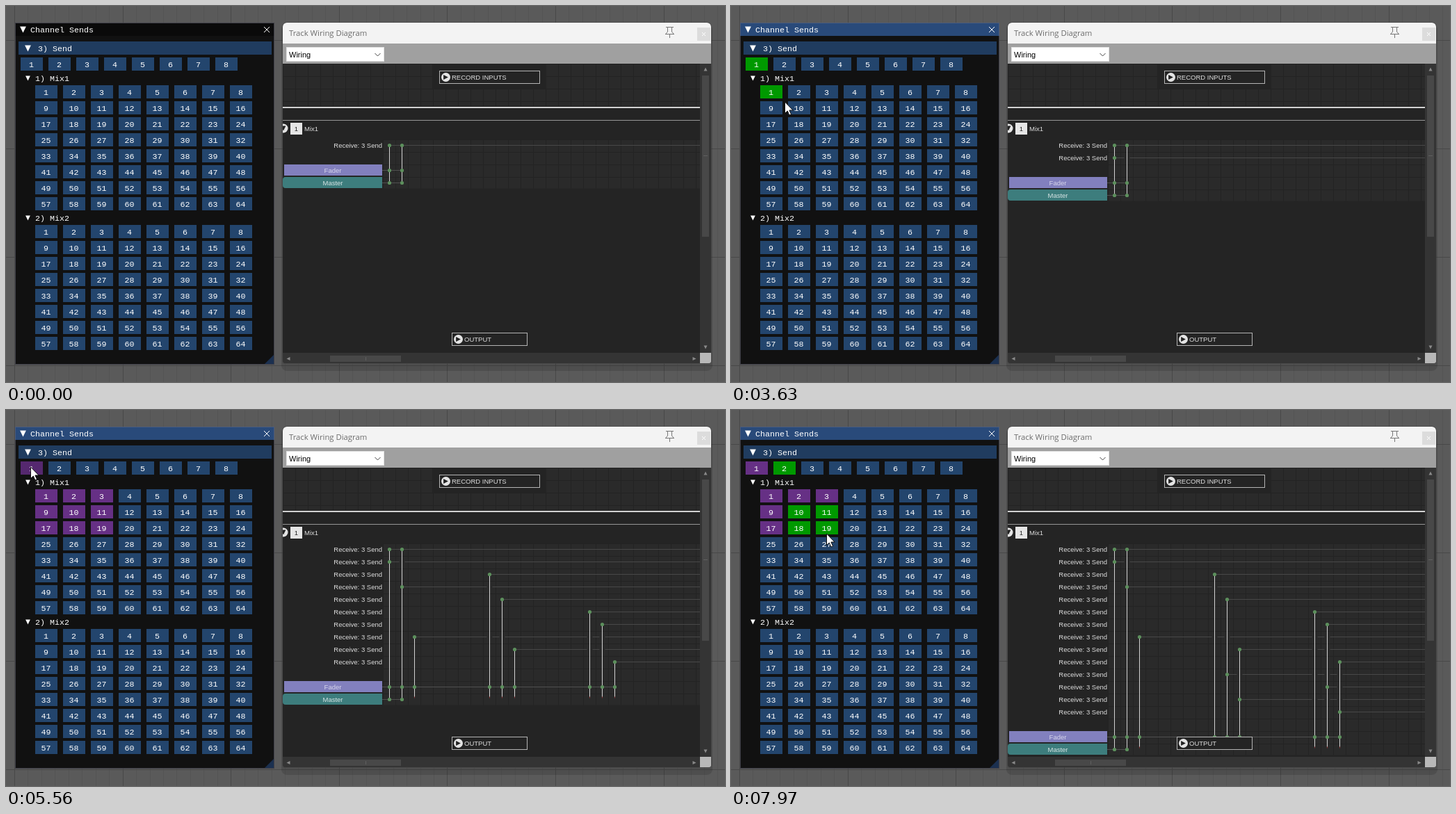
Animation, 1034 px wide and 541 px high, one loop 8000 ms. Source, as an HTML page with a canvas:

```html
<!DOCTYPE html>
<html lang="en">
<head>
<meta charset="utf-8">
<title>Channel Sends</title>
<style>
html, body { margin: 0; width: 100%; height: 100%; overflow: hidden; background: #5a5a5a; }
canvas { display: block; width: 100vw; height: 100vh; }
</style>
</head>
<body>
<canvas id="stage" width="1034" height="541"></canvas>
<script>
const ctx = document.getElementById('stage').getContext('2d');
const LOOP = 8000;
const MONO = '11.67px "Liberation Mono", monospace';
const SANS = '9.5px "Liberation Sans", Arial, sans-serif';

// Pointer strokes: start, end, destination. It rests in between.
const ENTRY = [376, 519];
const STROKES = [
  [360, 1090, 64, 191], [1260, 1380, 64, 133], [1380, 1860, 37, 80], [2460, 2770, 62, 124],
  [3420, 3630, 78, 138], [3630, 4100, 114, 168], [4160, 4460, 130, 171],
  [4700, 5050, 59, 94], [5050, 5320, 36, 82], [6060, 6400, 77, 82],
  [6890, 7360, 98, 147], [7590, 7790, 104, 164], [7790, 7970, 138, 178]
];

// Mouse button down and up
const SELECT = [2360, 2420], DRAG = [3300, 4460], DESELECT = [5500, 5560];
const SELECT_2 = [6590, 6710], DRAG_2 = [7470, LOOP];
const HOLDS = [SELECT, DRAG, DESELECT, SELECT_2, DRAG_2];

// Button fills: idle, hovered, held
const FILLS = {
  off: ['#23456d', '#4296fa', '#0f87fa'],
  on: ['#009900', '#008000', '#006600'],
  other: ['#663085', '#55286f', '#442059']
};

function rect(x, y, w, h, color) {
  ctx.fillStyle = color;
  ctx.fillRect(x, y, w, h);
}

function line(x1, y1, x2, y2, color) {
  ctx.strokeStyle = color;
  ctx.lineWidth = 1;
  ctx.beginPath();
  ctx.moveTo(x1, y1);
  ctx.lineTo(x2, y2);
  ctx.stroke();
}

function poly(points, color) {
  ctx.fillStyle = color;
  ctx.beginPath();
  points.forEach(([x, y]) => ctx.lineTo(x, y));
  ctx.closePath();
  ctx.fill();
}

function rounded(x, y, w, h, radii, color) {
  ctx.fillStyle = color;
  ctx.beginPath();
  ctx.roundRect(x, y, w, h, radii);
  ctx.fill();
}

function dot(x, y, r, color) {
  ctx.fillStyle = color;
  ctx.beginPath();
  ctx.arc(x, y, r, 0, 7);
  ctx.fill();
}

function text(str, x, y, color, font, align = 'left') {
  ctx.font = font;
  ctx.textAlign = align;
  ctx.fillStyle = color;
  ctx.fillText(str, x, y);
}

// Triangle pointing along (dx, dy)
function arrow(x, y, r, dx, dy, color) {
  poly([[x + dx * r, y + dy * r], [x - dx * r - dy * r, y - dy * r + dx * r],
    [x - dx * r + dy * r, y - dy * r - dx * r]], color);
}

function pointerAt(t) {
  if (t < STROKES[0][0]) return null;
  let [x, y] = ENTRY;
  STROKES.forEach(([start, end, toX, toY], i) => {
    if (t < start) return;
    let k = Math.min(1, (t - start) / (end - start));
    if (i === 0) k = k * (2 - k);
    x += (toX - x) * k;
    y += (toY - y) * k;
  });
  return [Math.round(x), Math.round(y)];
}

const sendBox = n => [21 + (n - 1) * 40, 74, 32, 19];
const cellBox = (i, top) => [42 + i % 8 * 40, top + (i >> 3) * 23, 32, 19];
const inside = (p, [x, y, w, h]) => !!p && p[0] >= x && p[0] < x + w && p[1] >= y && p[1] < y + h;

function cellUnder(p) {
  for (let i = 0; i < 64; i++) if (inside(p, cellBox(i, 114))) return i;
  return -1;
}

// Cells swept by a drag: everything between the first and the hovered cell, column by column
function swept([start, end], t) {
  const found = new Set();
  const first = cellUnder(pointerAt(start));
  for (let s = start; s <= Math.min(t, end); s += 10) {
    const cell = cellUnder(pointerAt(s));
    if (cell < 0) continue;
    for (let col = first % 8; col <= cell % 8; col++)
      for (let row = first >> 3; row <= cell >> 3; row++) found.add(row * 8 + col);
  }
  return [...found];
}

function drawDesk() {
  rect(0, 0, 1034, 541, '#5a5a5a');
  for (let i = 0; i < 53; i++) rect(Math.round(12 + i * 19.45), 0, 1, 541, i % 8 ? '#545454' : '#484848');
  for (let y = 49; y < 541; y += 156) rect(0, y, 1034, 1, '#484848');
}

function drawSends(t, mouse, firstCells, secondCells) {
  const hold = HOLDS.find(([down, up]) => t >= down && t < up);
  const grabbed = hold && pointerAt(hold[0]);

  function button(n, box, state) {
    const [x, y, w, h] = box;
    const look = !inside(mouse, box) ? 0 : !hold ? 1 : inside(grabbed, box) ? 2 : 0;
    rect(x, y, w, h, FILLS[state][look]);
    text(n, x + 15.5, y + 14, '#fff', MONO, 'center');
  }

  function treeRow(label, y) {
    const box = [21, y - 7, 357, 14];
    if (!hold && inside(mouse, box)) rect(...box, '#387bcb');
    arrow(31.5, y, 3.4, 0, 1, '#fff');
    text(label, 42, y + 4, '#fff', MONO);
  }

  rect(13, 24, 373, 492, '#111');
  rect(13, 24, 373, 19, t < SELECT[0] ? '#0a0a0a' : '#294a7a');
  ctx.strokeStyle = 'rgba(110,110,128,.5)';
  ctx.lineWidth = 1;
  ctx.strokeRect(13.5, 24.5, 372, 491);
  arrow(24.5, 34, 4.4, 0, 1, '#fff');
  text('Channel Sends', 35, 38, '#fff', MONO);
  line(371, 30, 379, 38, '#fff');
  line(379, 30, 371, 38, '#fff');
  poly([[385, 502], [385, 515], [372, 515]], '#1b3050');

  rect(18, 51, 364, 19, '#203c5f');
  arrow(31.5, 61, 4.4, 0, 1, '#fff');
  text('3) Send', 46, 65, '#fff', MONO);

  const firstState = t < DESELECT[0] ? 'on' : 'other';
  const sendState = n =>
    n === 1 && t >= SELECT[0] ? firstState : n === 2 && t >= SELECT_2[0] ? 'on' : 'off';
  for (let n = 1; n <= 8; n++) button(n, sendBox(n), sendState(n));

  treeRow('1) Mix1', 104);
  treeRow('2) Mix2', 305);
  for (let i = 0; i < 64; i++) {
    const state = secondCells.includes(i) ? 'on' : firstCells.includes(i) ? firstState : 'off';
    button(i + 1, cellBox(i, 114), state);
    button(i + 1, cellBox(i, 315), 'off');
  }
}

function grid(x0, y0, y1) {
  rect(x0, y0, 998 - x0, y1 - y0, '#2a2a2a');
  for (let x = x0; x < 998; x += 18) rect(x, y0, 1, y1 - y0, '#232323');
  for (let y = y0; y < y1; y += 18) rect(x0, y, 998 - x0, 1, '#232323');
}

function ioBox(label, x, y, w) {
  rect(x, y, w, 19, '#b4b4b4');
  rect(x + 1, y + 1, w - 2, 17, '#242424');
  dot(x + 9.5, y + 9.5, 6.5, '#e4e4e4');
  arrow(x + 9.5, y + 9.5, 3.4, 1, 0, '#222');
  text(label, x + 18, y + 13, '#dedede', SANS);
}

// Each receive row joins its source columns; the very first one is stereo
function drawMatrix(cells) {
  const rows = [[0, 1], ...cells.map(c => [c])];
  const rowY = r => 200.5 + r * 18;
  const colX = c => 551.5 + c * 18;
  const fader = rowY(rows.length + 1), master = fader + 18;

  const tops = new Map();
  rows.forEach((cols, r) => cols.forEach(c => tops.has(c) || tops.set(c, r)));

  grid(542, 192, master + 8);
  rows.forEach((cols, r) => {
    const y = rowY(r);
    line(colX(cols[0]), y, 998, y, '#484848');
    for (const [c, top] of tops)
      if (top < r && c > cols[0]) rect(colX(c) - 4, y - 1, 8, 2, '#2a2a2a');
    text('Receive: 3 Send', 541, y + 3.5, '#dedede', SANS, 'right');
  });
  line(541, fader, colX(Math.max(...tops.keys())), fader, '#505050');
  line(541, master, colX(1), master, '#505050');

  const node = (c, y) => dot(colX(c), y, 2.6, '#5c8f5c');
  for (const [c, top] of tops) {
    const end = c < 2 ? master : master - 3;
    line(colX(c), rowY(top), colX(c), end, '#d2d2d2');
    if (c > 1) rect(colX(c) - .5, end - 1, 1, 2, '#8c3434');
    node(c, fader);
    if (c < 2) node(c, master);
  }
  rows.forEach((cols, r) => cols.forEach(c => node(c, rowY(r))));

  rect(400, fader - 8.5, 141, 16, '#8280be');
  rounded(398, master - 8.5, 143, 16, [4, 0, 0, 4], '#3d7d7d');
  text('Fader', 470, fader + 3.5, '#d6d4ea', SANS, 'center');
  text('Master', 470, master + 3.5, '#d6e4e4', SANS, 'center');
}

function drawScrollbars() {
  rect(998, 83, 16, 416, '#343434');
  rect(1001, 100, 10, 232, '#484848');
  rect(1003, 215, 6, 1, '#606060');
  arrow(1006, 91, 2.5, 0, -1, '#8a8a8a');
  arrow(1006, 491, 2.5, 0, 1, '#8a8a8a');
  rect(398, 499, 600, 15, '#343434');
  rect(466, 503, 102, 9, '#484848');
  rect(517, 505, 1, 5, '#606060');
  arrow(406, 507.5, 2.5, -1, 0, '#8a8a8a');
  arrow(990, 507.5, 2.5, 1, 0, '#8a8a8a');
  rect(998, 499, 16, 15, '#b8b8b8');
}

function drawPin() {
  line(949, 30.5, 960, 30.5, '#777');
  line(951.5, 31, 951.5, 37, '#777');
  line(957.5, 31, 957.5, 37, '#777');
  line(951.5, 37, 948.5, 40.5, '#777');
  line(957.5, 37, 960.5, 40.5, '#777');
  line(948, 40.5, 961, 40.5, '#777');
  line(954.5, 41, 954.5, 46, '#777');
}

function drawWiring(cells) {
  rounded(396, 26, 620, 499, 8, 'rgba(0,0,0,.13)');
  ctx.save();
  ctx.beginPath();
  ctx.roundRect(398, 24, 616, 490, [6, 6, 3, 3]);
  ctx.clip();

  rect(398, 24, 616, 30, '#f3f3f3');
  text('Track Wiring Diagram', 407, 43, '#6c6c6c', '11.3px "Open Sans", sans-serif');
  drawPin();
  rect(994, 31, 19, 19, '#dcdcdc');
  line(1001, 38, 1006, 43, '#fff');
  line(1006, 38, 1001, 43, '#fff');

  rect(398, 54, 616, 29, '#a0a0a0');
  rect(403, 59, 141, 21, '#e0e0e0');
  rect(404, 60, 139, 19, '#fff');
  text('Wiring', 407, 74, '#000', '11px "Liberation Sans", Arial, sans-serif');
  line(530.5, 68, 534.5, 72, '#444');
  line(534.5, 72, 538.5, 68, '#444');

  rect(398, 83, 600, 416, '#242424');
  grid(398, 83, 144);
  rect(613, 83, 164, 36, '#242424');
  ioBox('RECORD INPUTS', 623, 93, 145);
  rect(398, 145, 600, 2, '#d2d2d2');
  rect(398, 164, 600, 1, '#969696');

  dot(399, 176, 6.5, '#e4e4e4');
  arrow(399, 176, 3.4, 0, 1, '#222');
  rect(409, 168, 17, 17, '#e6e6e6');
  text('1', 417.5, 180, '#222', SANS, 'center');
  text('Mix1', 429, 180, '#dedede', SANS);
  drawMatrix(cells);
  ioBox('OUTPUT', 641, 470, 109);
  drawScrollbars();
  ctx.restore();

  ctx.strokeStyle = 'rgba(70,70,70,.45)';
  ctx.lineWidth = 1;
  ctx.beginPath();
  ctx.roundRect(397.5, 23.5, 617, 491, [6, 6, 3, 3]);
  ctx.stroke();
}

function drawPointer([x, y]) {
  const shape = [[0, 0], [0, 16.5], [3.8, 13], [6.4, 19], [9, 17.8], [6.4, 12], [11.6, 12]];
  poly(shape.map(([dx, dy]) => [x + dx - .5, y + dy]), '#fff');
  ctx.strokeStyle = '#111';
  ctx.lineWidth = 1;
  ctx.stroke();
}

function draw(t) {
  const mouse = pointerAt(t);
  const firstCells = swept(DRAG, t), secondCells = swept(DRAG_2, t);
  drawDesk();
  drawSends(t, mouse, firstCells, secondCells);
  drawWiring([...firstCells, ...secondCells]);
  if (mouse) drawPointer(mouse);
}

const begin = performance.now();
function tick() {
  draw((performance.now() - begin) % LOOP);
  requestAnimationFrame(tick);
}
tick();
</script>
</body>
</html>
```
